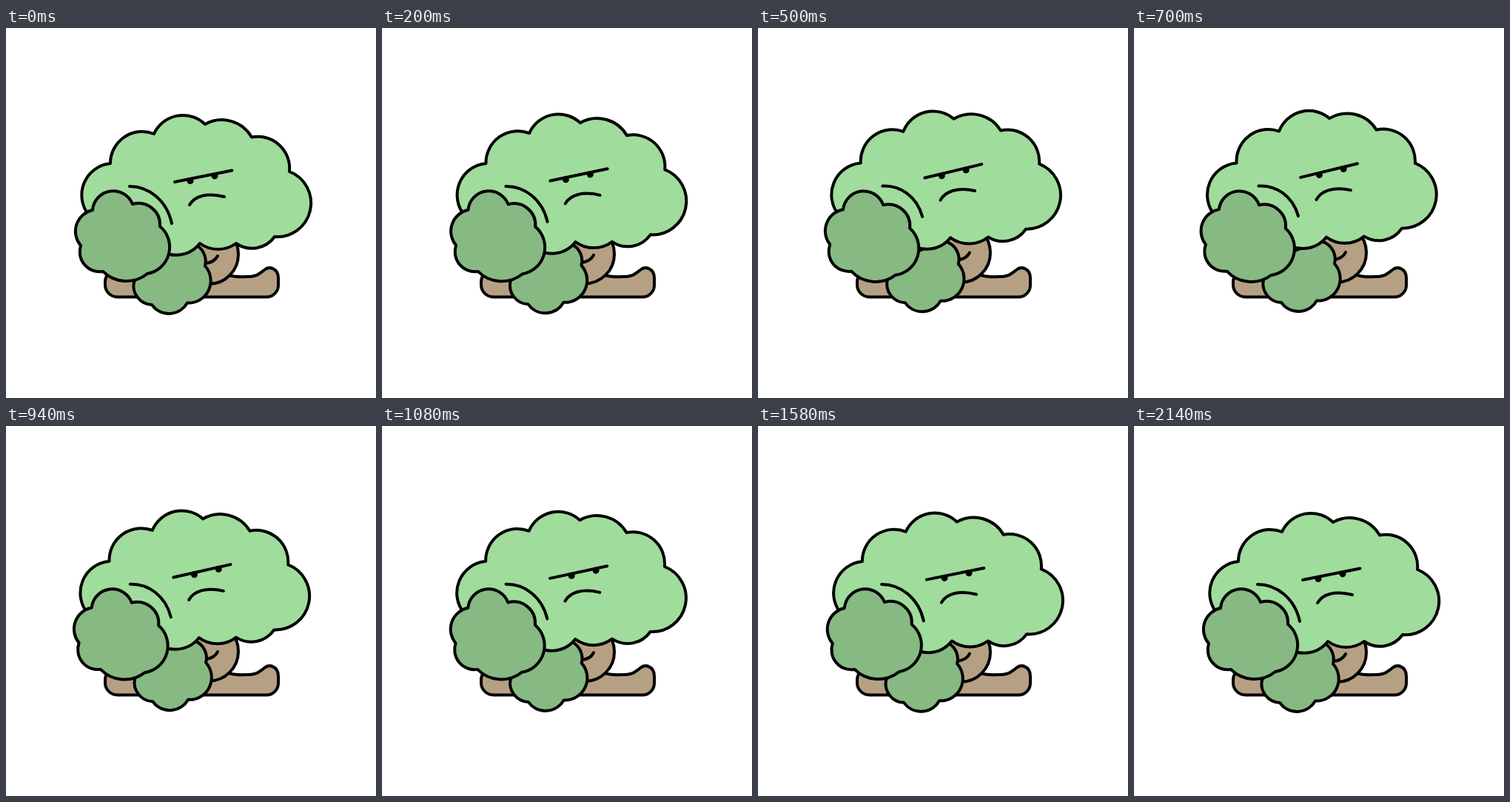
An HTML page for the animation above (2220 ms loop, 500x500 px).

```html
<!DOCTYPE html>
<html lang="en">
<head>
<meta charset="utf-8">
<title>Grumpy tree</title>
<style>
  html, body { margin: 0; width: 100%; height: 100%; overflow: hidden; background: #fff; }
  svg { display: block; width: 100vw; height: 100vh; }
  .ink { fill: none; stroke: #000; stroke-width: 4; stroke-linecap: round; stroke-linejoin: round; }
  .wood { fill: #b6a084; }
  .light { fill: #a0dc9c; }
  .dark { fill: #87b983; }
</style>
</head>
<body>
<svg viewBox="0 0 500 500">
  <path class="ink wood" d="M150 325C140 328 134 335 134 343V347A16.500 16.500 0 0 0 150.500 363.500H352A16 16 0 0 0 368 347.500V338C368 325 356 321 349 327C341 333 338 336 326 336C314 336.500 308 336 303 334.500L260 325Z"/>
  <circle id="torso" class="ink wood" cx="274" cy="306" r="40"/>
  <path id="fold" class="ink" d="M286 308C283 314 278 317 270 318"/>
  <path id="hand" class="ink dark" d="M225 300A25 25 0 0 1 269 321.500A30 30 0 0 1 245 371.500A28.500 28.500 0 0 1 197 374A25.600 25.600 0 0 1 173 343L200 310Z"/>
  <path id="crown" class="ink light"/>
  <g id="face">
    <g id="eyes">
      <circle cx="249" cy="206.500" r="4.500"/>
      <circle cx="282" cy="199.900" r="4.500"/>
    </g>
    <path class="ink" d="M228 208L305.500 192.500M248 239C255 227 272 222 295 228"/>
  </g>
  <path id="arm" class="ink"/>
  <path id="fist" class="ink dark" d="M117 246A28 28 0 0 1 171 238A29 29 0 0 1 208 268A36.500 36.500 0 0 1 191 332A45 45 0 0 1 131 329A27 27 0 0 1 101 294A29.500 29.500 0 0 1 117 246Z"/>
</svg>
<script>
  const LOOP = 2220;
  const $ = id => document.getElementById(id);
  const place = (id, value) => $(id).setAttribute('transform', value);
  const shape = (id, d) => $(id).setAttribute('d', d);
  const span = (t, a, b) => Math.min(1, Math.max(0, (t - a) / (b - a)));
  const sine = p => (1 - Math.cos(Math.PI * p)) / 2;

  // Long soft landing, as cubic-bezier(.28, 0, 0, 1)
  function settle(p) {
    let lo = 0, hi = 1;
    for (let i = 0; i < 24; i++) {
      const u = (lo + hi) / 2;
      const x = 0.84 * u * (1 - u) ** 2 + u ** 3;
      if (x < p) lo = u; else hi = u;
    }
    return lo * lo * (3 - 2 * lo);
  }

  const breath = t => t < 630 ? sine(t / 630) : 1 - settle(span(t, 630, 2140));
  const glance = t => sine(span(t, 160, 1220)) - sine(span(t, 1280, 1800));

  // Each entry: x, y, how far a full breath moves it, radius of the lobe ending there
  const crownPoints = [
    [112, 253, -2.5, 0.5],
    [141, 183, -2.5, -0.5, 43],
    [200, 143, -4, -3.5, 43],
    [269, 130, -5, -8, 43],
    [332, 147.5, -4.5, -10, 46.5],
    [383, 194, -3.2, -11.5, 43],
    [363, 282, -1, -11.5, 45.6],
    [311, 291, 0, -9.5, 37.5],
    [262, 291, -2, -8.5, 41.5],
    [200, 294, -2, -9, 41]
  ];
  const armPoints = [
    [167, 214, 1.5, -0.5], [192, 214, -1, -2],
    [217, 232, -3, -6], [224, 264, -2, -10]
  ];
  const moved = ([x, y, dx, dy], b) => `${x + dx * b} ${y + dy * b}`;

  function draw(t) {
    const b = breath(t), g = glance(t);
    const [first, ...lobes] = crownPoints;
    shape('crown', `M${moved(first, b)}` +
      lobes.map(p => `A${p[4]} ${p[4]} 0 0 1 ${moved(p, b)}`).join('') + 'L130 270Z');
    place('face', `rotate(${-2.35 * b} 76 275)`);
    place('eyes', `translate(${8.5 * g} ${-1.7 * g})`);
    place('fist', `translate(0 ${0.5 * b}) rotate(${2.3 * b} 150 190)`);
    place('hand', `translate(${2 * b} ${-3 * b})`);
    place('torso', `translate(0 ${-2.5 * b})`);
    place('fold', `translate(0 ${-5 * b})`);
    const [from, c1, c2, to] = armPoints.map(p => moved(p, b));
    shape('arm', `M${from}C${c1} ${c2} ${to}`);
  }

  const start = performance.now();
  function tick() {
    draw((performance.now() - start) % LOOP);
    requestAnimationFrame(tick);
  }
  tick();
</script>
</body>
</html>
```
